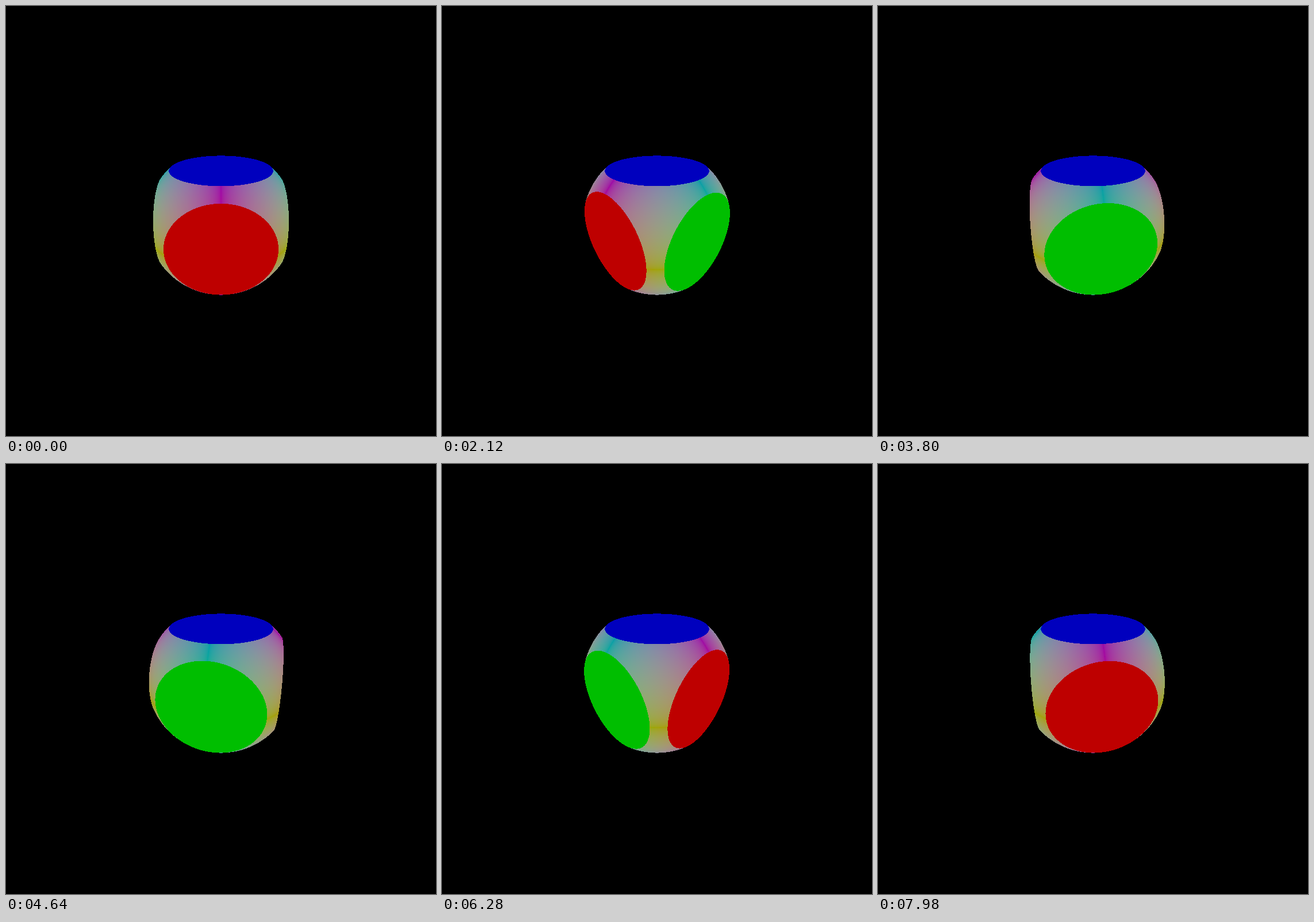
An HTML page with a canvas that plays this animation: 748x748 px, repeating every 8000 ms.

```html
<!DOCTYPE html>
<html>
<head>
<meta charset="utf-8">
<style>
  html, body { margin: 0; width: 100%; height: 100%; overflow: hidden; background: #000; }
  canvas { display: block; width: 748px; height: 748px; }
</style>
</head>
<body>
<canvas id="stage" width="748" height="748"></canvas>
<script>
const SIZE = 748, HALF = SIZE / 2, LOOP = 8000;
const DISTANCE = 4, PITCH = Math.PI / 6, RADIUS = 1.3; // the cube's half side is 1
const LEVEL = 190, GAMMA = 1 / 2.2;

const ctx = document.getElementById('stage').getContext('2d');
const LEFT = 240, TOP = 254, WIDTH = 268, HEIGHT = 254;
const image = ctx.createImageData(WIDTH, HEIGHT);
const pixels = new Uint32Array(image.data.buffer);
const BLACK = 0xff000000;

const shade = Array.from({ length: 1025 }, (_, i) => Math.round(LEVEL * (i / 1024) ** GAMMA));
const channel = n => shade[Math.min(1024, Math.round(Math.abs(n) * 1024))];
const pack = (r, g, b) => (BLACK | b << 16 | g << 8 | r) >>> 0;
const RED = pack(LEVEL, 0, 0), GREEN = pack(0, LEVEL, 0), BLUE = pack(0, 0, LEVEL);

// Nearest hit of a ray with the sphere-cube intersection, in object space.
function trace(ox, oy, oz, dx, dy, dz) {
  const a = dx * dx + dy * dy + dz * dz;
  const b = ox * dx + oy * dy + oz * dz;
  const disc = b * b - a * (DISTANCE * DISTANCE - RADIUS * RADIUS);
  if (disc < 0) return BLACK;
  const root = Math.sqrt(disc);
  const nearX = -ox / dx - Math.abs(1 / dx), farX = -ox / dx + Math.abs(1 / dx);
  const nearY = -oy / dy - Math.abs(1 / dy), farY = -oy / dy + Math.abs(1 / dy);
  const nearZ = -oz / dz - Math.abs(1 / dz), farZ = -oz / dz + Math.abs(1 / dz);
  const nearBall = (-b - root) / a;
  const t = Math.max(nearBall, nearX, nearY, nearZ);
  if (t > Math.min((-b + root) / a, farX, farY, farZ)) return BLACK;
  if (t === nearX) return GREEN;
  if (t === nearY) return BLUE;
  if (t === nearZ) return RED;
  return pack(
    channel((oz + t * dz) / RADIUS),
    channel((ox + t * dx) / RADIUS),
    channel((oy + t * dy) / RADIUS)
  );
}

function draw(degrees) {
  const angle = degrees * Math.PI / 180;
  const c = Math.cos(angle), s = Math.sin(angle);
  const cp = Math.cos(PITCH), sp = Math.sin(PITCH);
  const eyeY = DISTANCE * sp, eyeZ = DISTANCE * cp;
  for (let j = 0, k = 0; j < HEIGHT; j++) {
    const v = (HALF - TOP - j - 0.5) / HALF;
    const y = v * cp - sp, z = -v * sp - cp;
    for (let i = 0; i < WIDTH; i++, k++) {
      const x = (LEFT + i + 0.5 - HALF) / HALF;
      pixels[k] = trace(s * eyeZ, eyeY, c * eyeZ, c * x + s * z, y, c * z - s * x);
    }
  }
  ctx.putImageData(image, LEFT, TOP);
}

// One degree per step; steps last 20, 100 and 20 ms in turn.
function stepAt(ms) {
  const phase = ms % 140;
  return 3 * Math.floor(ms / 140) + (phase >= 20) + (phase >= 120);
}

let shown = -1;
function tick() {
  const step = stepAt(performance.now() % LOOP);
  if (step !== shown) draw(shown = step);
  requestAnimationFrame(tick);
}
tick();
</script>
</body>
</html>
```
